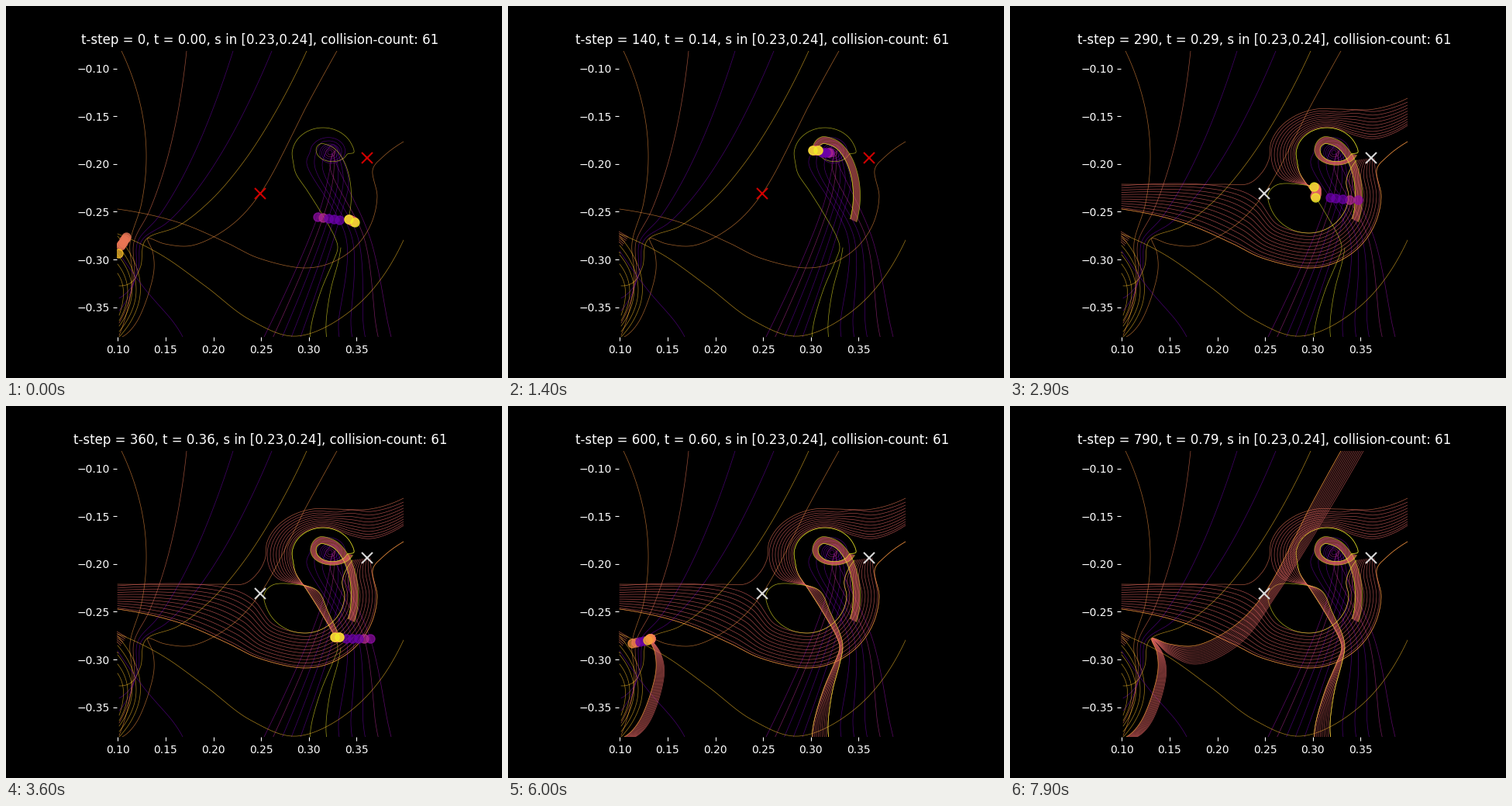
Animation of 640x480 px, one loop 8 s. Source, as a matplotlib script:

```python
import numpy as np
import matplotlib.pyplot as plt
from matplotlib.animation import FuncAnimation

STEP = 100          # ms per picture
FRAMES = 80
SCALE = 1232        # pixels per data unit
CX, CY = 0.2491, -0.2313

plt.style.use("dark_background")
fig, ax = plt.subplots(figsize=(6.4, 4.8), dpi=100)
ax.set_aspect("equal")
ax.set_xlim(CX - 0.15, CX + 0.15)
ax.set_ylim(CY - 0.15, CY + 0.15)
for side in ax.spines.values():
    side.set_visible(False)
title = ax.set_title("")

plasma = plt.get_cmap("plasma")
PURPLE, PLUM, PINK, CORAL, ORANGE, GOLD, YELLOW = 0.2, 0.4, 0.6, 0.66, 0.75, 0.87, 0.98
tracks = []


def to_data(p):
    p = np.asarray(p, float)
    return np.column_stack([CX + (p[:, 0] - 328) / SCALE, CY - (p[:, 1] - 242.4) / SCALE])


def arc(cx, cy, rx, ry, a0, a1, grow=1):
    """Points on an ellipse, degrees anticlockwise; radius may grow on the way."""
    n = int(abs(a1 - a0) / 25) + 2
    a, g = np.radians(np.linspace(a0, a1, n)), np.linspace(1, grow, n)
    return list(zip(cx + rx * g * np.cos(a), cy - ry * g * np.sin(a)))


def bezier(a, b, c, n=6):
    s = np.linspace(0, 1, n)[:, None]
    return [tuple(p) for p in (1 - s)**2 * np.array(a) + 2 * s * (1 - s) * np.array(b)
            + s**2 * np.array(c)]


def route(parts, pts=None, keys=None):
    """Flatten points; a bare number is the time in ms at the point before it."""
    pts, keys = ([], []) if pts is None else (pts, keys)
    for part in parts:
        if np.isscalar(part):
            keys.append((max(len(pts) - 1, 0), part))
        elif isinstance(part, list):
            route(part, pts, keys)
        elif not pts or np.hypot(part[0] - pts[-1][0], part[1] - pts[-1][1]) > 1:
            pts.append(part)
    return pts, keys


def spline(p, m=14):
    """Hermite curve through the points, m samples per span."""
    p = np.asarray(p, float)
    h = np.sqrt(np.hypot(*np.diff(p, axis=0).T))
    u = np.r_[0, np.cumsum(h)]
    edge = 2 if len(p) > 2 else 1
    tan = np.gradient(p, u, axis=0, edge_order=edge)
    s = np.linspace(0, 1, m, endpoint=False)[None, :, None]
    k = h[:, None, None]
    a, b = p[:-1, None], p[1:, None]
    ta, tb = tan[:-1, None] * k, tan[1:, None] * k
    q = ((2 * s**3 - 3 * s**2 + 1) * a + (s**3 - 2 * s**2 + s) * ta
         + (3 * s**2 - 2 * s**3) * b + (s**3 - s**2) * tb)
    return np.vstack([q.reshape(-1, 2), p[-1:]])


def fixed(parts, c):
    pts, _ = route(parts)
    ax.plot(*to_data(spline(pts)).T, color=plasma(c), lw=0.5, alpha=0.65, zorder=1)


def track(parts, c, shown=False, trace=True, z=3):
    """A particle on a route, with its whole curve shown and/or a trace behind it."""
    pts, keys = route(parts)
    m = 14
    xy = to_data(spline(pts, m))
    dist = np.r_[0, np.cumsum(np.hypot(*np.diff(xy, axis=0).T))]
    if shown:
        fixed(parts, c)
    trail, = ax.plot([], [], color=plasma(c), lw=0.5, alpha=0.7, zorder=2, visible=trace)
    dot, = ax.plot([], [], "o", ms=8, color=plasma(c), alpha=0.72, zorder=z)
    marks = [dist[i * m] for i, _ in keys]
    tracks.append((xy, dist, [t for _, t in keys], marks, trail, dot))


def bundle(path, weights, c=PINK, **kw):
    for w in weights:
        track(path(w), c(w) if callable(c) else c, **kw)


# Each path below takes w in [0, 1], the particle's place in its bundle.

def swarm(w):
    """Up, round the centre in a widening spiral and down again."""
    rx, ry = 3 + 10 * w, 3 + 8 * w
    return [(333 + 47 * w, 427), (402 + 28 * w, 272 + 4 * w), 0, (415 + 27 * w, 225),
            arc(418, 189, rx, ry, 0, 180), 1400,
            arc(418, 189, rx, ry, 180, 330 + 210 * w, 1 + w),
            (428 - 40 * w, 208 - 5 * w), 2300, (470 - 31 * w, 300), 3600,
            (493 - 64 * w, 410), 4600, (497 - 67 * w, 427), 4800]


def rise(w):
    """Strip up the right side and through the small loop."""
    o = 9 * w - 4.5
    return [0, arc(408, 245, 42 + o, 72 + o, -26, 90),
            arc(408, 186, 11.5 + 0.8 * o, 13 + o, 90, 180), 1400,
            arc(421, 186, 24.5 + 0.8 * o, 17 + 0.5 * o, 180, 340), 1650]


def fall(w):
    """Strip down from the big loop, narrowest at its bend."""
    def at(x, y):
        return x + (2 * w - 1) * (2 + max(0.075 * (y - 312), 0.06 * (312 - y))), y
    return [at(395, 238), at(411, 266), at(427, 298), 3600, at(430, 312), at(425, 331),
            at(413, 366), at(404, 407), 4600, at(403, 427), 4800]


def over(w):
    """From the right edge over the top of the big loop."""
    return [(513, 154 - 30 * w), 1550, (472, 171 - 35 * w), (446, 167 - 33 * w),
            arc(409, 192, 42 + 30 * w, 36 + 21 * w, 75, 193), 2300,
            (374 - 24 * w, 216 + 6 * w), fall(w)]


def under_arc(w):
    return arc(385, 243, 52 + 42 * w, 50 + 45 * w, 20, -90)


def under(w):
    """Below the big loop and out through the left edge."""
    return [(447 + 24 * w, 199 - 3 * w), 1650, under_arc(w), (345 - 20 * w, 282 + 43 * w),
            (319 - 31 * w, 250 + 57 * w), 2300, (285 - 60 * w, 235 + 45 * w),
            (144, 232 + 30 * w), 2700]


def sweep(w):
    """Up the lower left corner, through a focus, then fanning to the upper right."""
    o = 14 * w - 7
    return [(157 + o, 427), 5150, (176 + o, 407), (196 + 0.8 * o, 345),
            (193 + 0.5 * o, 318), (183 + w, 300), 6000, (205, 307 + 13 * w),
            (240, 309 + 24 * w), 6450, (288 + 8 * w, 285 + 22 * w), (328 + 17 * w, 242),
            6950, (390 + 20 * w, 125 + 12 * w), 7180, (427 + 29 * w, 58), 7380]


bundle(swarm, np.linspace(0, 1, 5), lambda w: PLUM if w == 0.25 else 0.3 - 0.1 * (w > 0),
       shown=True, trace=False)

bundle(rise, np.linspace(0.08, 0.92, 11))
track(rise(1), YELLOW)
track([rise(0), arc(409, 192, 40, 35, 5, 197), 2300, (374, 216), fall(0)],
      YELLOW, shown=True, z=4)

bundle(over, np.linspace(0, 1, 10) ** 1.2)
track([(513, 119), 1550, (470, 133), arc(409, 192, 75, 60, 80, 185), (325, 215), 2300,
       (308, 229), (275, 230), (144, 230), 2700], CORAL)

bundle(under, np.linspace(0, 0.95, 11))
track([(513, 175), 1560, (487, 194), under(1)[2:]], ORANGE, shown=True)
track([(447, 199), 1650, under_arc(0), arc(385, 243, 52, 50, -90, -180)[1:], 2300,
       (344, 231), (372, 230), fall(1)], YELLOW)
fixed(fall(1)[4:], YELLOW)

bundle(sweep, np.linspace(0.08, 1, 12))
track(sweep(0), ORANGE, shown=True, z=4)

# loners leaving through the top, and arcs in the lower left corner
tops = ((149, ORANGE), (233, CORAL), (293, PURPLE), (343, PURPLE), (388, GOLD))
for i, (x, c) in enumerate(tops):
    d = x - 149
    gate = (160 + 5 * i, 306 - i)
    track([bezier((146, 425 - 16 * i), (170 + i, 365), gate, 4), 6000,
           bezier(gate, (207 + 0.0014 * d * d, 180 + 0.4 * d), (x, 58)), 7230],
          c, shown=True, trace=False)
    fixed(bezier((144, 297 + 12 * i), (202 - 11 * i, 365), (146, 427 - 7 * i)), GOLD)

# left group at the start
bundle(lambda w: [(155 - 7 * w, 298 + 11 * w), 0, (143, 291 + 13 * w), 250],
       np.linspace(0, 1, 6), CORAL)
track([(145, 319), 0, (136, 313), 200], GOLD)

# two strays crossing the bottom
track([(513, 302), 1800, (450, 389), (375, 426), (315, 405), (258, 362), 2300,
       (200, 321), (144, 294), 2520], GOLD, shown=True, trace=False)
track([(228, 427), 2250, (216, 408), 2300, (180, 366), (144, 316), 2520],
      PURPLE, shown=True, trace=False)

# collision marks turn from red to white
marks = []
for p, when in (((465.5, 196), 1700), ((328, 242.4), 2400)):
    x, y = to_data([p])[0]
    mark, = ax.plot([x], [y], "x", ms=10, mew=1.5, zorder=6)
    marks.append((mark, when))


def draw(n):
    t = n * STEP
    title.set_text(f"t-step = {n * 10}, t = {n / 100:.2f}, s in [0.23,0.24], collision-count: 61")
    for xy, dist, times, lengths, trail, dot in tracks:
        if t < times[0]:
            trail.set_data([], [])
            dot.set_data([], [])
            continue
        d = np.interp(t, times, lengths)
        here = [np.interp(d, dist, xy[:, 0]), np.interp(d, dist, xy[:, 1])]
        inside = (dist >= lengths[0]) & (dist < d)
        trail.set_data(*np.vstack([xy[inside], here]).T)
        dot.set_data(*([v] if t <= times[-1] else [] for v in here))
    for mark, when in marks:
        mark.set_color("#d8d8d8" if t >= when else "#d00000")
    return []


anim = FuncAnimation(fig, draw, frames=FRAMES, interval=STEP, repeat=True,
                     repeat_delay=0, init_func=lambda: draw(0))
plt.show()
```
